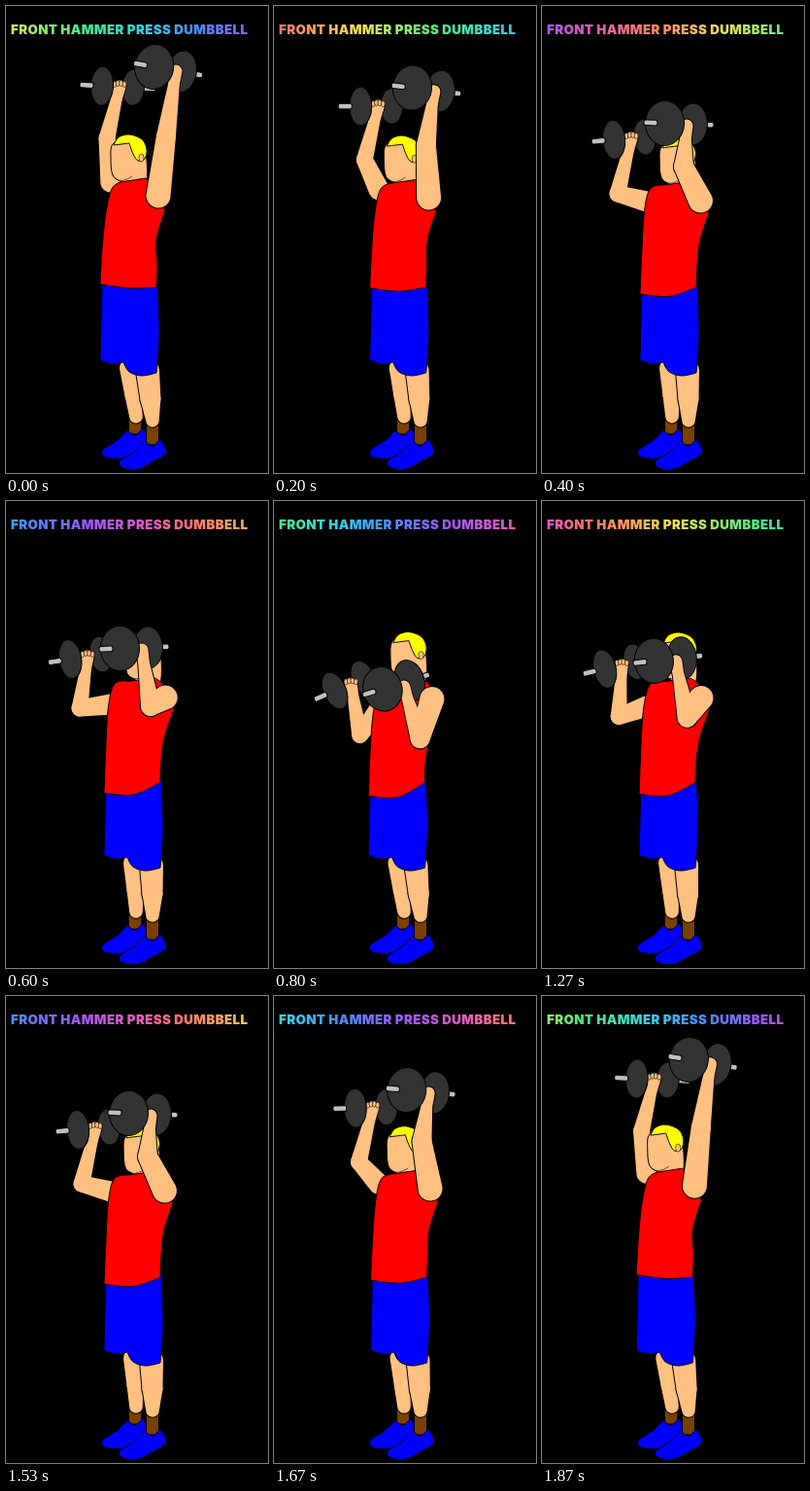
An HTML page with a canvas for the animation above (1.94 s loop, 270 by 480 pixels).

```html
<!DOCTYPE html>
<html lang="en">
<head>
<meta charset="utf-8">
<title>Front hammer press dumbbell</title>
<style>
  html, body { margin: 0; width: 100%; height: 100%; overflow: hidden; background: #000; }
  canvas { position: absolute; left: 0; top: 0; }
  h1 {
    position: absolute; left: 5px; top: 15px; margin: 0;
    font: 900 13.3px/18px Inter, "Open Sans", sans-serif; letter-spacing: .4px;
    white-space: nowrap; color: transparent;
    background: linear-gradient(90deg, #ff7a68, #ffa85c 9%, #f2e24e 17%, #48ee86 36%,
      #34d2e6 50%, #4690ff 61%, #9a58fa 75%, #e85cb8 90%, #ff7a68) 0 0 / 461px 100%;
    -webkit-background-clip: text; background-clip: text;
  }
</style>
</head>
<body>
<canvas width="270" height="480"></canvas>
<h1>FRONT HAMMER PRESS DUMBBELL</h1>
<script>
const LOOP = 1940, STEP = 1000 / 15, FRAMES = 29;
const SKIN = '#ffc080', RED = '#f00', BLUE = '#00f', HAIR = '#ff0', IRON = '#333', STEEL = '#c0c0c0', SOCK = '#7a4000';
const ctx = document.querySelector('canvas').getContext('2d');
const title = document.querySelector('h1');

// Key poses from overhead to chest; `body` is lean, hip sway, hem drop, bell tilt.
const keys = [
  { at: 0, nearBell: [167, 65], nearElbow: [165, 134], farBell: [115, 83], farElbow: [104, 136], body: [0, 0, 0, 10] },
  { at: 6, nearBell: [141, 121], nearElbow: [146, 165], farBell: [90, 136], farElbow: [78, 193], body: [8, 4, 10, 2] },
  { at: 9, nearBell: [132, 151], nearElbow: [149, 211], farBell: [82, 160], farElbow: [76, 213], body: [9, 4, 14, -2] },
  { at: 14, nearBell: [124, 202], nearElbow: [151, 254], farBell: [76, 198], farElbow: [94, 250], body: [6.5, -1, 18, -23] }
];

// Smooth curve through the keys, at rest at both ends.
function poseAt(frame) {
  const i = Math.max(0, keys.findLastIndex(k => k.at <= frame && k.at < 14));
  const a = keys[i], b = keys[i + 1], span = b.at - a.at, u = (frame - a.at) / span;
  const slope = (j, name, n) => {
    const p = keys[j - 1], q = keys[j + 1];
    return p && q ? (q[name][n] - p[name][n]) / (q.at - p.at) * span : 0;
  };
  const mix = (name, n) => {
    const v = a[name][n], d = b[name][n] - v;
    return v + d * u * u * (3 - 2 * u)
      + slope(i, name, n) * u * (1 - u) ** 2 - slope(i + 1, name, n) * u * u * (1 - u);
  };
  const pose = {};
  for (const name in a) if (name !== 'at') pose[name] = a[name].map((_, n) => mix(name, n));
  return pose;
}

function paint(color) {
  ctx.fillStyle = color;
  ctx.fill();
  ctx.stroke();
}

function placed(x, y, angle, draw) {
  ctx.save();
  ctx.translate(x, y);
  ctx.rotate(angle);
  draw();
  ctx.restore();
}

// Closed smooth outline; the listed points stay sharp.
function blob(pts, color, corners = []) {
  const n = pts.length, at = i => pts[(i + n) % n];
  const handle = (i, dir) => at(i).map((v, k) =>
    corners.includes(i % n) ? v : v + (at(i + 1)[k] - at(i - 1)[k]) * dir / 6);
  ctx.beginPath();
  ctx.moveTo(...pts[0]);
  pts.forEach((_, i) => ctx.bezierCurveTo(...handle(i, 1), ...handle(i + 1, -1), ...at(i + 1)));
  ctx.closePath();
  paint(color);
}

function oval(x, y, rx, ry, color) {
  ctx.beginPath();
  ctx.ellipse(x, y, rx, ry, 0, 0, 7);
  paint(color);
}

// Tapered tube through joints [x, y, radius], outlined as one shape.
function limb(joints) {
  const parts = joints.slice(1).map(([x, y, r], i) => {
    const [px, py, pr] = joints[i], a = Math.atan2(y - py, x - px), q = Math.PI / 2;
    const part = new Path2D();
    part.arc(px, py, pr, a + q, a + 3 * q);
    part.arc(x, y, r, a - q, a + q);
    part.closePath();
    return part;
  });
  ctx.fillStyle = SKIN;
  ctx.lineWidth = 2;
  parts.forEach(p => ctx.stroke(p));
  parts.forEach(p => ctx.fill(p));
  ctx.lineWidth = 1;
}

function arm(shoulder, elbow, hand, size) {
  const [ex, ey] = elbow, [hx, hy] = hand, reach = Math.hypot(hx - ex, hy - ey);
  const wrist = [hx + (ex - hx) * 13 / reach, hy + (ey - hy) * 13 / reach];
  limb([[...shoulder, 12.5 * size], [...elbow, 10 * size], [...wrist, 5.8], [...hand, 6.5]]);
}

function barEnd(x) {
  ctx.beginPath();
  ctx.roundRect(x - 7, -2.8, 14, 5.6, 2);
  paint(STEEL);
}

// Plates sit either side of the grip, bar ends twice as far out.
function bell([x, y], tilt, half, [rx, ry]) {
  const angle = tilt * Math.PI / 180;
  return {
    back: () => placed(x, y, angle, () => {
      barEnd(2 * half);
      oval(half, 0, rx > 15 ? 15 : rx, ry - 1.5, IRON);
    }),
    front: () => placed(x, y, angle, () => {
      oval(-half, 0, rx, ry, IRON);
      barEnd(-2 * half);
    })
  };
}

function foot(dx, dy) {
  placed(dx, dy, 0, () => {
    ctx.beginPath();
    ctx.rect(144.5, 430, 13, 21);
    paint(SOCK);
    blob([[143, 447], [151, 452], [159, 445], [165, 459], [150, 469], [136, 476], [121, 475], [117, 468], [133, 457]], BLUE, [0, 2]);
  });
}

function lowerBody(sway) {
  foot(-18, -11);
  foot(0, 0);
  limb([[126 + sway, 372, 9], [131 + sway / 2, 400, 8.5], [134, 422, 6.8]]);
  limb([[146 + sway, 375, 12], [149 + sway / 2, 404, 10.5], [151, 426, 6.8]]);
  placed(sway, 0, 0, () => blob([[99, 284], [97, 364], [109, 368], [121, 366], [127, 376], [140, 380], [155, 377], [158, 335], [156, 284]],
    BLUE, [0, 1, 3, 6, 8]));
}

function head(lean) {
  placed(lean * 1.65, lean * .35, 0, () => {
    blob([[110, 142], [108, 157], [110, 174], [119, 181], [132, 190], [144, 184], [145, 158], [140, 137], [125, 134]], SKIN);
    blob([[111, 143], [116, 135], [127, 132], [140, 137], [145, 147], [143, 157], [136, 159], [131, 152], [127, 141]], HAIR, [0, 8]);
    ctx.lineWidth = .6;
    oval(139.5, 156, 2.6, 4, SKIN);
    ctx.beginPath();
    ctx.moveTo(112, 177);
    ctx.quadraticCurveTo(119, 183, 130, 175);
    ctx.stroke();
    ctx.lineWidth = 1;
  });
}

function shirt(lean, sway, drop) {
  blob([
    [118 + lean, 181 + drop * .3], [109 + lean * .3, 188], [103 + sway * .6, 212], [99 + sway, 250],
    [97 + sway, 286 + drop], [127 + sway, 290 + drop * .85], [155 + sway, 289],
    [156 + sway, 265], [155 + lean, 240], [164 + lean, 210 + drop * .3],
    [154 + lean, 190], [144 + lean, 177 + drop * .35]
  ], RED, [0, 4, 6, 9, 11]);
}

function knuckles(x, y) {
  ctx.lineWidth = .6;
  for (let i = -1.5; i < 2; i++) oval(x + i * 3.4, y - 4 + Math.abs(i), 2, 3, SKIN);
  ctx.lineWidth = 1;
}

function draw(frame) {
  const { nearBell, nearElbow, farBell, farElbow, body } = poseAt(Math.min(frame, FRAMES - frame));
  const [lean, sway, drop, tilt] = body;
  const near = bell(nearBell, tilt, 14.5, [20, 23]);
  const far = bell(farBell, tilt - 7, 16, [11.5, 20]);
  const farHand = [farBell[0] + 2, farBell[1]];
  ctx.clearRect(0, 0, 270, 480);
  ctx.strokeStyle = '#000';
  ctx.lineJoin = 'round';

  lowerBody(sway);
  far.back();
  arm([108, 181 + drop * 2], farElbow, farHand, .85);
  knuckles(...farHand);
  far.front();
  head(lean);
  shirt(lean, sway, drop);
  near.back();
  arm([157 + lean * .8, 195 + drop * .5], nearElbow, [nearBell[0] + 8, nearBell[1] + 2], 1);
  near.front();

  title.style.backgroundPositionX = (720 * frame / FRAMES - 72) / 360 * 461 + 'px';
}

function tick() {
  const t = performance.now() % LOOP;
  draw(Math.min(FRAMES - 1, Math.floor((t + 4) / STEP)));
  requestAnimationFrame(tick);
}
tick();
</script>
</body>
</html>
```
